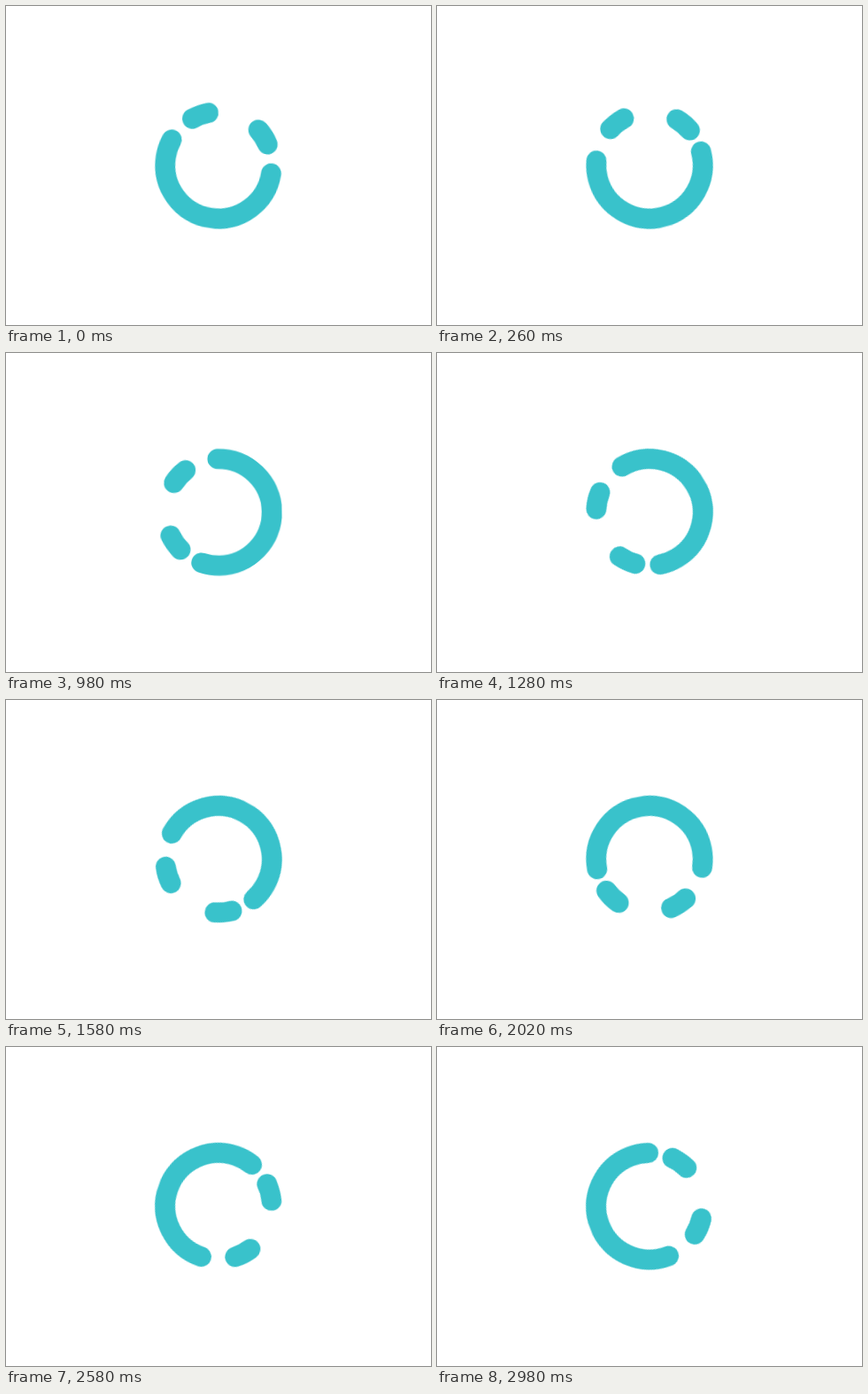
Animation of 480 by 360 pixels, one loop 3 s. Source, as an HTML page:

```html
<!DOCTYPE html>
<html lang="en">
<head>
<meta charset="utf-8">
<title>Loader</title>
<style>
  html, body {
    margin: 0;
    width: 100%;
    height: 100%;
    overflow: hidden;
    background: #fff;
  }
  svg {
    display: block;
    width: 480px;
    height: 360px;
  }
  circle {
    fill: none;
    stroke: #39c2cb;
    stroke-width: 22.8;
    stroke-linecap: round;
  }
  .long { stroke-dasharray: 199.7 160.3; }
  .short { stroke-dasharray: 18.5 341.5; }

  .spin { animation: spin 3s linear infinite; }
  .swing { animation: swing 3s cubic-bezier(.37, 0, .63, 1) infinite; }
  .wide { --tilt: 16deg; }
  .slight { --tilt: 4.4deg; }

  @keyframes spin {
    from { transform: rotate(0deg); }
    to { transform: rotate(-300deg); }
  }

  /* The loop opens halfway through a swing and cuts hard at its end. */
  @keyframes swing {
    0% {
      transform: rotate(calc(var(--tilt) * .44));
      animation-timing-function: cubic-bezier(.61, 1, .88, 1);
    }
    7.67%, 67.67% { transform: rotate(var(--tilt)); }
    18%, 78% { transform: rotate(calc(var(--tilt) * -.95)); }
    26%, 53.33%, 86%, 100% { transform: rotate(0deg); }
  }
</style>
</head>
<body>
<svg viewBox="-240 -179.7 480 360">
  <g class="spin">
    <g class="swing slight">
      <circle class="long" r="60.2" pathLength="360" transform="rotate(7.1)"/>
    </g>
    <g class="swing wide">
      <circle class="short" r="60.2" pathLength="360" transform="rotate(-48.5)"/>
      <circle class="short" r="60.2" pathLength="360" transform="rotate(233.6)"/>
    </g>
  </g>
</svg>
</body>
</html>
```
